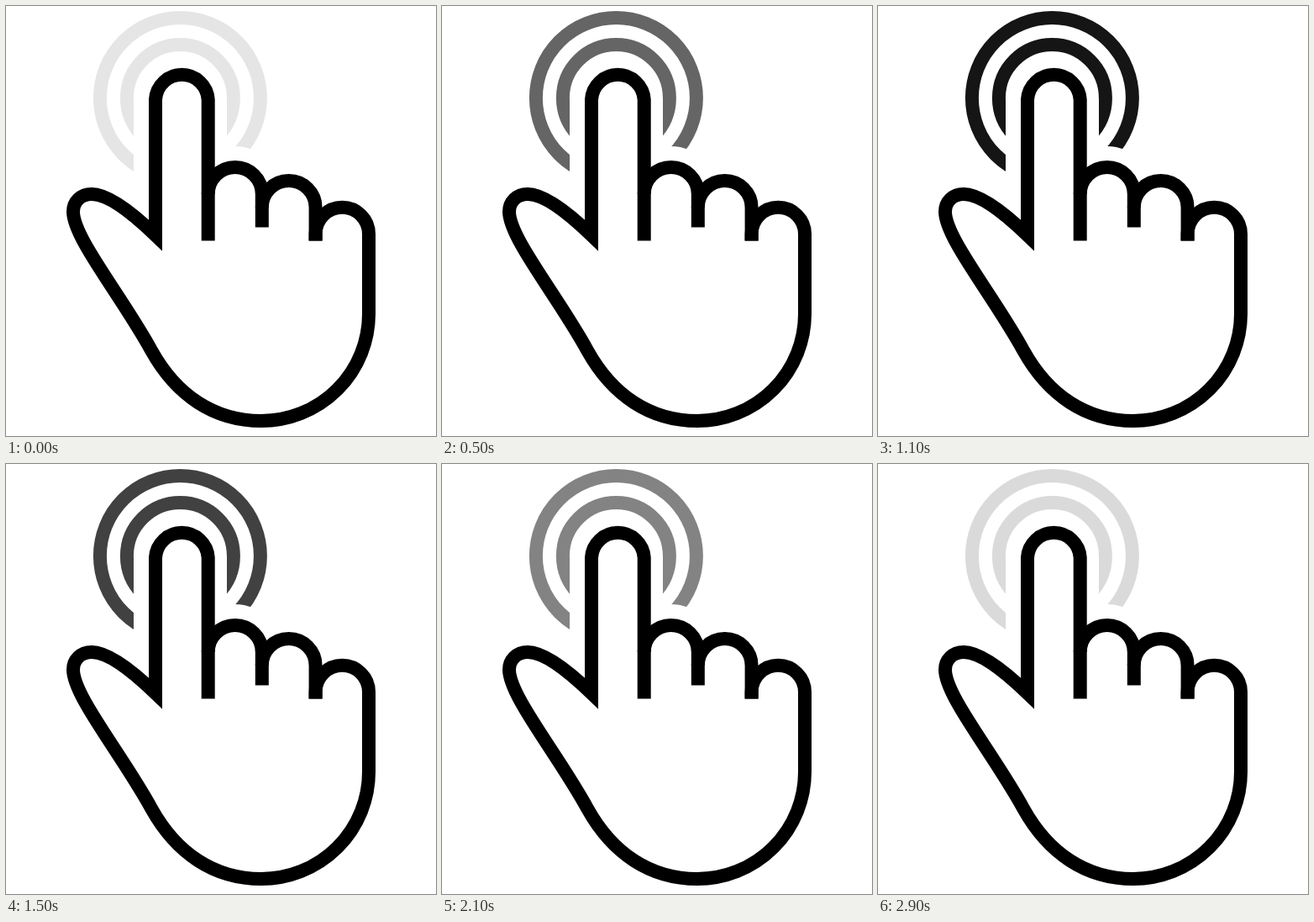
An HTML page that plays this animation: 512 px wide and 512 px high, repeating every 3000 ms.

```html
<!DOCTYPE html>
<html lang="en">
<head>
<meta charset="utf-8">
<title>Tap</title>
<style>
  html, body { margin: 0; width: 100%; height: 100%; overflow: hidden; background: #fff; }
  svg { display: block; width: 100%; height: 100%; }
  .line { fill: none; stroke: #000; stroke-width: 16; stroke-miterlimit: 4; }
  .rings { animation: pulse 3s infinite; }
  .gap { fill: #fff; }

  /* quick stepped rise, slower stepped fade */
  @keyframes pulse {
    0% { opacity: .1; animation-timing-function: steps(9, end); }
    30% { opacity: 1; animation-timing-function: steps(10, end); }
    96.6667% { opacity: .143; animation-timing-function: step-end; }
    100% { opacity: .1; }
  }
</style>
</head>
<body>
<svg viewBox="0 0 512 512">
  <g class="line rings">
    <circle cx="207.4" cy="109.5" r="95.5"/>
    <circle cx="207.4" cy="109.5" r="63.5"/>
  </g>
  <g class="gap">
    <rect x="152" y="109.5" width="111" height="110"/>
    <circle cx="272.7" cy="223" r="56"/>
  </g>
  <g class="line">
    <!-- index finger, thumb, palm and little finger -->
    <path d="M240.7 279.5V111.5A31.4 31.4 0 0 0 178 111.5V273
      C150 246 122 224 102 224C89 224 80 233 80 245
      C80 276 138 346 173 410C203 464 248 494 304 494
      A128 127.5 0 0 0 432 366.5V271.5A31.7 31.7 0 0 0 368.6 271.5V279.5"/>
    <!-- middle and ring fingers -->
    <path d="M240.7 224A32 32 0 0 1 304.8 224V263.5"/>
    <path d="M304.8 240A31.9 31.9 0 0 1 368.6 240V279.5"/>
  </g>
</svg>
</body>
</html>
```
